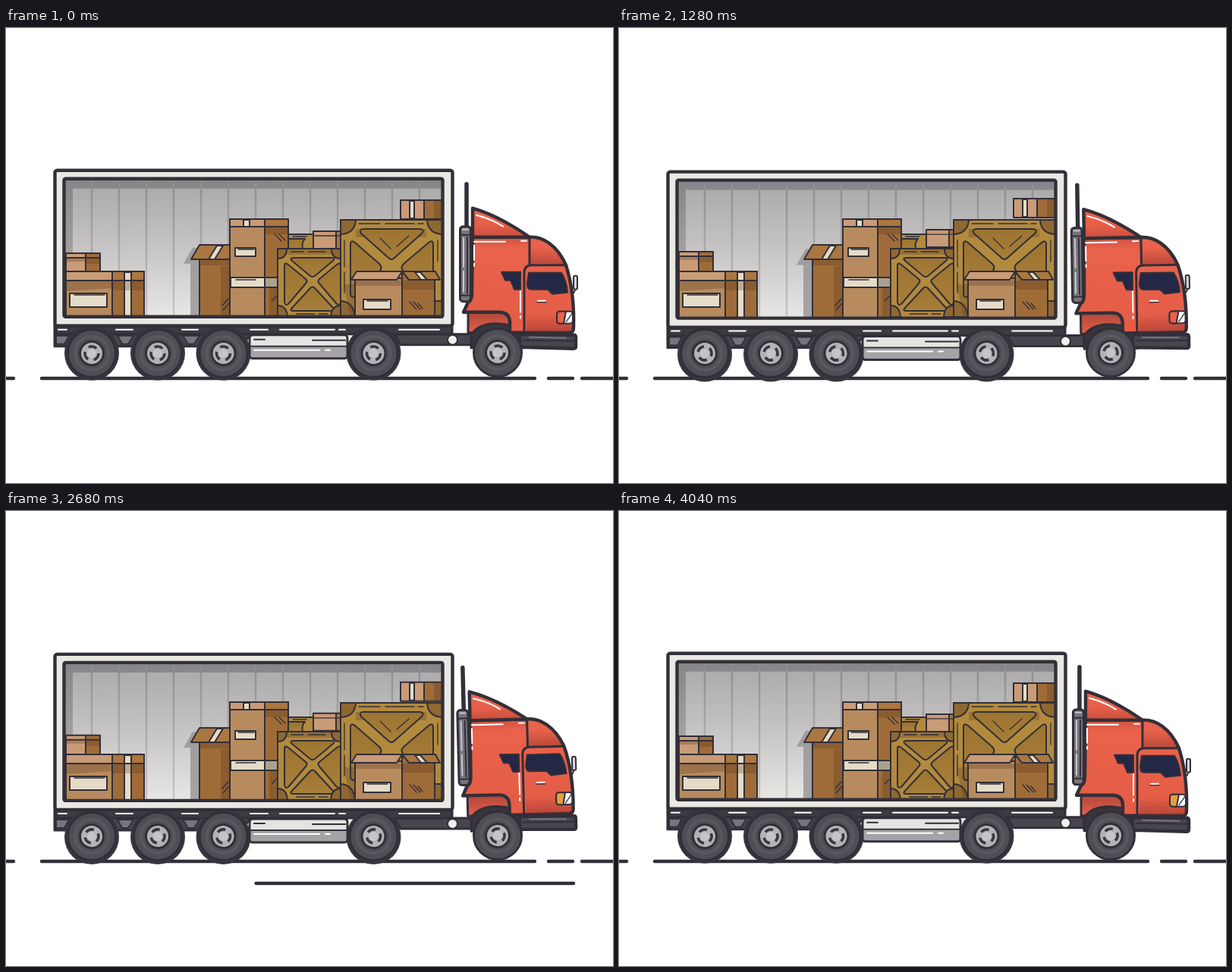
Recreate the animation shown at these times as an HTML page. Size 800 px wide and 600 px high, loop 4.08 s.

```html
<!DOCTYPE html>
<html lang="en">
<head>
<meta charset="utf-8">
<title>Truck</title>
<style>
html, body { margin: 0; width: 100%; height: 100%; overflow: hidden; background: #fff }
svg { display: block; width: 800px; height: 600px }
.ink { stroke: #322f38; stroke-width: 2; stroke-linejoin: round; stroke-linecap: round }
.no { stroke: none }
.line { fill: none }
.bold { stroke-width: 4.4 }
.mid { stroke-width: 3 }
.thin { stroke-width: 1.3 }
.tan { fill: #b78b5e }
.pale { fill: #c99b77 }
.brown { fill: #9f6c39 }
.flap { fill: #ab7740 }
.cream { fill: #e5dcc8 }
.gold { fill: #b28a3e }
.rust { fill: #8f6831 }
.dark { fill: #48454d }
.shade { fill: #53341b; opacity: .28; stroke: none }
.shine { fill: none; stroke: #fff }
</style>
</head>
<body>
<svg viewBox="0 0 800 600">
<defs>
  <linearGradient id="wall" x2="0" y2="1">
    <stop offset="0" stop-color="#a9a8a9"/><stop offset=".45" stop-color="#c3c1c1"/><stop offset="1" stop-color="#e9e7e5"/>
  </linearGradient>
  <linearGradient id="seam" y1="200" x2="0" y2="380" gradientUnits="userSpaceOnUse">
    <stop offset="0" stop-color="#8d8b8e"/><stop offset="1" stop-color="#c8c6c6"/>
  </linearGradient>
  <linearGradient id="edge" x2="0" y2="1">
    <stop offset="0" stop-color="#858487"/><stop offset="1" stop-color="#bdbbbb"/>
  </linearGradient>
  <linearGradient id="wood" x2="0" y2="1">
    <stop offset="0" stop-color="#9c7431"/><stop offset="1" stop-color="#a87f39"/>
  </linearGradient>
  <linearGradient id="red" x2="0" y2="1">
    <stop offset="0" stop-color="#ea634d"/><stop offset="1" stop-color="#e45c46"/>
  </linearGradient>
  <linearGradient id="deep" x2="0" y2="1">
    <stop offset="0" stop-color="#7d2a25" stop-opacity="0"/><stop offset="1" stop-color="#7d2a25" stop-opacity=".42"/>
  </linearGradient>
  <linearGradient id="under" x2="0" y2="1">
    <stop offset="0" stop-color="#b04638"/><stop offset="1" stop-color="#e2604a"/>
  </linearGradient>
  <g id="tire">
    <circle r="31.500" fill="#504e55" class="ink mid"/>
    <circle r="22" fill="none" stroke="#5a585f" stroke-width="4"/>
  </g>
  <g id="hub">
    <circle r="15.500" fill="#b4b2b6" class="ink mid"/>
    <circle r="9" fill="none" stroke="#3a373f" stroke-width="3.500" stroke-dasharray="11.2 7.65"/>
    <circle r="6" fill="#c6c4c8"/>
  </g>
</defs>

<g class="ink">
  <!-- road -->
  <path class="line bold" d="M-5 462H10M47 462H697M715 462H747M759 462H805"/>
  <path id="streak" class="line bold"/>

  <!-- chassis and container -->
  <g class="bob">
    <path class="dark mid" d="M64 392H322V405L310 420H64Z"/>
    <path fill="#77747c" d="M66 406H83L77 417H66ZM147 406H168L161 417H153ZM233 406H255L248 417H240Z"/>
    <path class="dark mid" d="M512 404H622V418H520Z"/>
    <path class="mid" fill="#3d3a42" d="M65 393H588V404H65Z"/>
    <path class="shine" d="M69 398H80M145 398H167M232 398H253M322 398H345M361 398H433M439 398H447M518 398H571"/>
    <g class="no" fill="#38353d">
      <circle cx="113" cy="429" r="36"/><circle cx="200" cy="429" r="36"/>
      <circle cx="286.500" cy="429" r="36"/><circle cx="484.500" cy="429" r="36"/>
    </g>
    <rect x="321" y="405" width="129" height="31" rx="4" fill="#e5e4e3"/>
    <path class="no" fill="#a5a3a6" d="M322 421H449V432Q449 435 446 435H325Q322 435 322 432Z"/>
    <rect class="line mid" x="321" y="405" width="129" height="31" rx="4"/>
    <path class="line" d="M322 420H449M327 411H341M404 412H447"/>
    <path class="shine" d="M327 425H413M421 425H427"/>
    <rect class="bold" x="64.500" y="188" width="524" height="205" rx="3" fill="#e9e8e3"/>
    <rect class="no" x="77" y="200" width="498" height="181" fill="url(#wall)"/>
    <path class="no" fill="url(#edge)" d="M78 200H575V212H88V380H78Z"/>
    <path id="seams" class="line" style="stroke:url(#seam);stroke-width:2.5"/>
    <path class="no" fill="#918f90" opacity=".75" d="M234 311L246 290H256V380H243V311Z"/>
  </g>

  <!-- cargo -->
  <g>
    <g class="hop">
      <path class="pale" d="M79 297H105V323H79Z"/><path class="brown" d="M105 297H124V323H105Z"/>
      <path class="line" d="M79 303H124"/>
      <path class="shade" d="M80 304H104V308H80ZM106 304H123V311H106Z"/>
    </g>
    <path class="tan" d="M79 321H140V382H79Z"/><path class="brown" d="M140 321H182V382H140Z"/>
    <path class="cream no" d="M156 322H165V381H156Z"/>
    <path class="pale" d="M79 321H140V333H79Z"/><path class="flap" d="M140 321H182V333H140Z"/>
    <path class="cream" d="M156 322H165V333H156Z"/>
    <path class="line" d="M156 333V381M165 333V381"/>
    <path class="shade" d="M80 334H139V343L80 347ZM141 334H181V346H141Z"/>
    <path class="cream" d="M84 350H133V368H84Z"/><path class="line thin" d="M90 352H130"/>

    <path class="brown" d="M255 300H296V382H255Z"/>
    <path class="shade" d="M256 306H295V313H256ZM283 314H295V381H283Z"/>
    <path class="flap" d="M244 305L255 286H298V305Z"/>
    <path class="cream" d="M267 305L278 287H286L275 305Z"/>
    <path class="tan" d="M295 252H341V382H295Z"/><path class="brown" d="M341 252H372V382H341Z"/>
    <path class="pale" d="M295 252H341V262H295Z"/><path class="flap" d="M341 252H372V262H341Z"/>
    <path class="cream" d="M313 253H321V262H313Z"/>
    <path class="shade" d="M342 263H371V272H342ZM347 343H358V381H347Z"/>
    <path class="cream" d="M296 329H341V342H296Z"/><path fill="#aaa28f" d="M341 329H358V342H341Z"/>
    <path class="cream" d="M302 290H329V301H302Z"/>
    <path class="line thin" d="M306 292H327M303 332H329M285 366L293 357M286 372L294 363M354 272L363 281M360 272L368 280M350 360L357 353"/>

    <path class="gold" d="M372 272H441V300H372Z"/>
    <path fill="url(#wood)" d="M372 278H394Q389 283 391 291H372Z"/>
    <path class="line thin" d="M378 275H396"/>
    <g class="hop">
      <path class="pale" d="M405 268H435V291H405Z"/><path class="flap" d="M435 268H442V291H435Z"/>
      <path class="line thin" d="M405 274H441"/>
    </g>
    <path class="gold" d="M358 291H441V382H358Z"/>
    <path class="shade" d="M359 292H440V299H359Z"/>
    <g fill="url(#wood)">
      <path d="M379 303H430Q435 303 431 307L407 327Q404 329 401 327L377 307Q373 303 379 303Z"/>
      <path d="M379 373H430Q435 373 431 369L407 343Q404 340 401 343L377 369Q373 373 379 373Z"/>
      <path d="M367 314Q367 308 372 312L395 331Q398 334 395 337L372 364Q367 367 367 360Z"/>
      <path d="M441 314Q441 308 436 312L413 331Q410 334 413 337L436 364Q441 367 441 360Z"/>
    </g>
    <path class="rust" d="M358 291H370Q370 304 358 304ZM441 291H429Q429 304 441 304ZM358 381V366Q370 366 371 381ZM441 381V366Q429 366 428 381Z"/>
    <path class="line thin" d="M376 295H392M398 295H421M383 377H407M412 377H424"/>

    <path class="gold" d="M441 253H575V382H441Z"/>
    <path class="shade" d="M461 265H554V276H461Z"/>
    <g fill="url(#wood)">
      <path d="M470 265H546Q552 266 548 271L512 303Q508 307 504 303L468 271Q465 266 470 265Z"/>
      <path d="M454 284Q455 279 460 283L492 311Q497 316 492 321L460 354Q454 357 454 350Z"/>
      <path d="M563 284Q562 279 557 283L524 311Q519 316 524 321L557 354Q563 357 563 350Z"/>
    </g>
    <path class="rust" d="M441 253H461Q460 271 441 272ZM575 253H555Q556 271 575 272ZM441 381V360Q458 361 460 381ZM575 381V360H563V381Z"/>
    <path class="line thin" d="M465 258H493M500 258H538M543 258H550M446 280V315M446 322V349M569 280V308M493 277L507 291M515 288L531 274"/>
    <g class="hop">
      <path class="pale" d="M520 227H551V252H520Z"/><path class="brown" d="M551 227H575V252H551Z"/>
      <path class="cream" d="M532 228H538V251H532Z"/>
      <path class="shade" d="M564 228H574V251H564Z"/>
    </g>

    <path class="shade" d="M445 338H460V381H454Z"/>
    <path class="tan" d="M460 330H522V382H460Z"/><path class="brown" d="M522 324H565V382H522Z"/>
    <path class="shade" d="M461 333H521V340H461ZM523 333H564V345H523Z"/>
    <path class="pale" d="M455 332L462 321H522L515 332Z"/>
    <path class="flap" d="M522 321H566L572 332H531Z"/>
    <path class="cream" d="M539 322H546L555 332H547Z"/>
    <path class="cream" d="M471 358H507V371H471Z"/>
    <path class="line thin" d="M476 360H503M532 361L541 371M537 361L546 371M543 363L549 370"/>
  </g>

  <g class="bob">
    <rect class="line bold" x="76.500" y="199" width="499" height="182" rx="2"/>

    <!-- cab -->
    <g id="cab">
      <path class="line" style="stroke-width:5.5" d="M607 206V263"/>
      <rect class="mid" x="598.500" y="262" width="14" height="99" rx="4" fill="#77747c"/>
      <path class="line" d="M599 273H612M599 353H612M608 276V350"/>
      <path class="shine" style="stroke:#c9c7ca" d="M603 277V315M603 321V348M602 266H609"/>
      <path class="mid" fill="url(#under)" d="M609 374H664V402H609Z"/>
      <path class="mid" fill="#38353d" d="M613 405Q622 390 646 390Q672 391 683 404L684 422H613Z"/>
      <path class="bold" fill="url(#red)" d="M615 276H690C707 275 726 286 738 313C745 335 749 365 748 396Q748 402 742 402H664V387Q663 375 650 375H603L609 362Q614 360 614 350Z"/>
      <path class="no" fill="url(#deep)" d="M691 290H722L736 312H691Z"/>
      <path class="no" fill="url(#deep)" d="M686 378H746V401H686Z"/>
      <path class="no" fill="url(#deep)" opacity=".6" d="M616 277H689V291H616Z" transform="rotate(180 652.500 284)"/>
      <path class="bold" fill="url(#red)" d="M615 238C636 244 664 258 690 276H615Z"/>
      <path class="no" fill="url(#deep)" opacity=".6" d="M617 260H664L686 275H617Z"/>
      <path class="line mid" d="M690 277V313M683 402V323Q683 313 693 313H738"/>
      <path fill="#222845" d="M689 323H732Q739 334 740 349L720 351L714 345H692Q687 345 687 337Z"/>
      <path fill="#222845" d="M653 322H678V345H670L665 333H658Z"/>
      <path class="shine" d="M617 282H658M679 281H686M617 287V306M617 311V314M678 347V375M678 380V383M701 360H711M620 247Q640 252 655 262"/>
      <path class="line thin" d="M700 362H712"/>
      <rect x="726" y="374" width="21" height="16" rx="4" fill="#fff"/>
      <path id="lamp" d="M730 374H738L735 390H730Q726 390 726 386V378Q726 374 730 374Z"/>
      <path class="line thin" d="M738 388L746 377"/>
      <path class="line" d="M750 344Q750 349 746 351"/>
      <rect x="748" y="327" width="5" height="18" rx="2" fill="#d7d6d8"/>
      <path class="dark bold" d="M677 404L748 405Q751 405 751 408V420Q751 423 748 423L677 421Z"/>
      <path class="line" d="M682 412L750 413"/>
      <path class="line" style="stroke:#77747c" d="M690 408L738 409"/>
    </g>
    <circle cx="588.500" cy="411.500" r="6.500" fill="#f1f0ee"/>
  </g>
</g>
<g id="wheels"></g>
</svg>
<script>
const $ = id => document.getElementById(id);
const LOOP = 4080, TAU = 2 * Math.PI;
const all = name => [...document.querySelectorAll(name)];
const bobs = all('.bob'), hops = all('.hop');
const wave = (t, cycles) => (1 - Math.cos(TAU * cycles * t / LOOP)) / 2;
const clamp = v => Math.min(1, Math.max(0, v));
const shift = (parts, y) => parts.forEach(p => p.setAttribute('transform', `translate(0 ${y})`));

let seams = '';
for (let x = 113; x < 560; x += 36) seams += `M${x} 203V379`;
$('seams').setAttribute('d', seams);

$('wheels').innerHTML = [113, 200, 286.5, 484.5, 648].map(x =>
  `<g transform="translate(${x} ${x > 600 ? 428 : 429})"><use href="#tire"/><use class="hub" href="#hub"/></g>`).join('');
const hubs = all('.hub');

function draw(now) {
  const t = now % LOOP;
  const bob = 2 * wave(t, 5);
  shift(bobs, bob - 0.3);
  shift(hops, -bob);
  $('cab').setAttribute('transform', `rotate(${-1.7 * wave(t, 4)} 588 411)`);
  hubs.forEach(h => h.setAttribute('transform', `rotate(${360 * 7 * t / LOOP})`));
  $('lamp').setAttribute('fill', t * 13 / LOOP % 1 < .5 ? '#e9604a' : '#e3a03f');

  // speed line shoots left, then its tail catches up
  const head = 748 - 701 * clamp((t - 2490) / 320);
  const tail = 748 - 701 * clamp((t - 2690) / 320);
  $('streak').setAttribute('d', tail > head ? `M${head} 491H${tail}` : '');
  requestAnimationFrame(draw);
}
requestAnimationFrame(draw);
</script>
</body>
</html>
```
